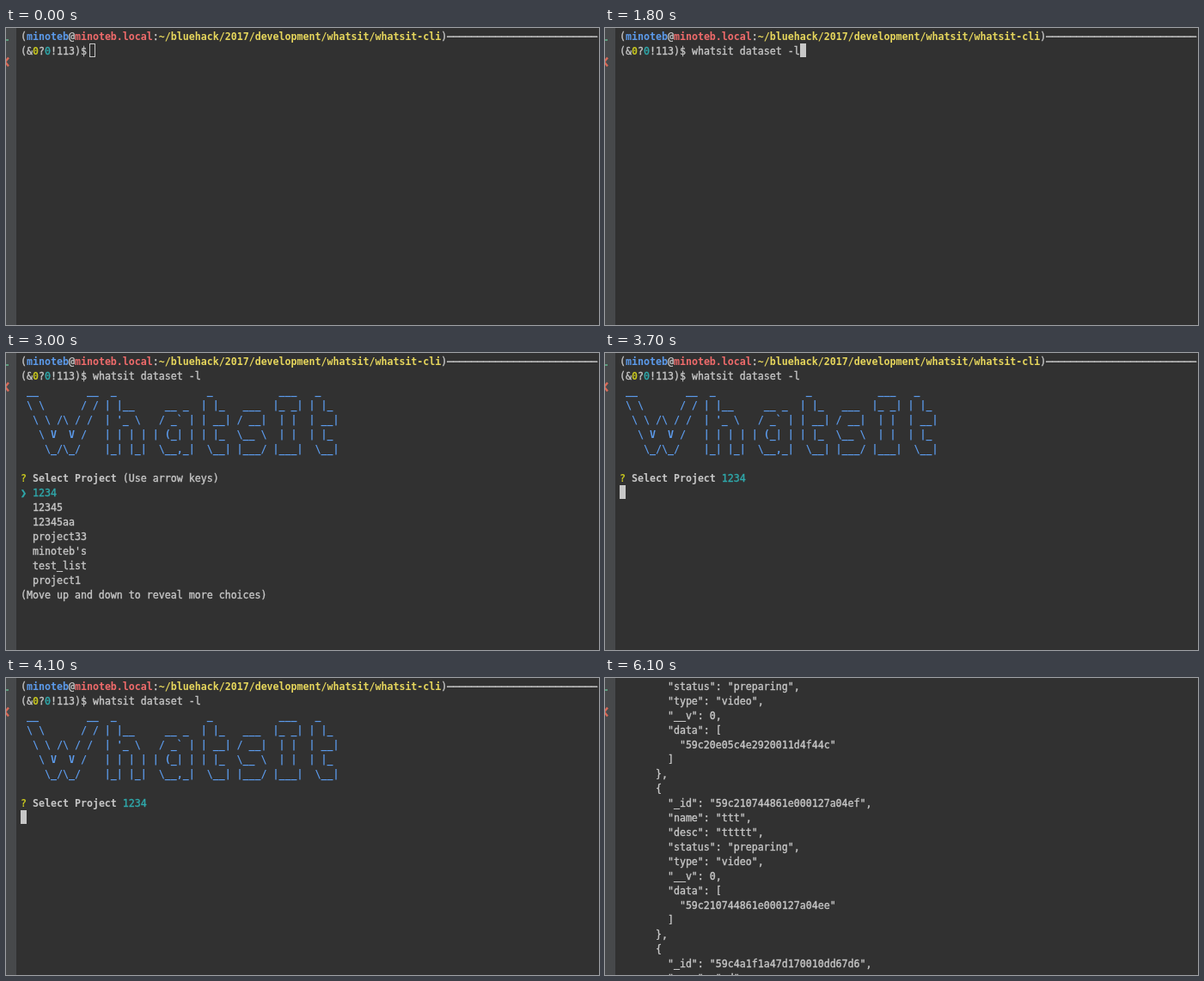
Write an HTML page that moves like this. It is 690 px wide and 346 px high and loops after 6200 ms.

```html
<!DOCTYPE html>
<html lang="en">
<head>
<meta charset="utf-8">
<title>Terminal session</title>
<style>
  html, body { margin: 0; width: 100%; height: 100%; overflow: hidden; background: #313131; }
  #stage { position: relative; width: 690px; height: 346px; overflow: hidden; }
  pre {
    position: absolute; left: 17px; top: 2px; margin: 0; color: #c7c7c7;
    font: 11.627px/17px "DejaVu Sans Mono", "Liberation Mono", monospace;
    font-variant-ligatures: none;
    -webkit-text-stroke: 0.35px;
  }
  pre.menu { top: 138px; }
  pre.banner { top: 36px; }
  b { -webkit-text-stroke: 0; }
  .blue { color: #5c9bec; }
  .red { color: #ef6b6b; }
  .gold { color: #e6d65c; }
  .lime { color: #c5c41f; }
  .cyan { color: #2fa9ab; }
  .arrow { display: inline-block; width: 1ch; }
  #cursor { position: absolute; width: 7px; height: 16px; box-sizing: border-box; border: 1px solid #c7c7c7; }
  #bar { position: absolute; left: 0; top: 0; }
</style>
</head>
<body>
<div id="stage">
  <pre id="prompt">(<b class="blue">minoteb</b>@<b class="red">minoteb.local</b>:<b class="gold">~/bluehack/2017/development/whatsit/whatsit-cli</b>)─────────────────────────
(&amp;<b class="lime">0</b>?<span class="cyan">0</span>!113)$ <span id="typed"></span></pre>

  <pre id="banner" class="banner blue"><b> __        __  _               _           ___   _
 \ \      / / | |__     __ _  | |_   ___  |_ _| | |_
  \ \ /\ / /  | '_ \   / _` | | __| / __|  | |  | __|
   \ V  V /   | | | | | (_| | | |_  \__ \  | |  | |_
    \_/\_/    |_| |_|  \__,_|  \__| |___/ |___|  \__|</b></pre>

  <pre id="menu" class="menu"><b class="lime">?</b> <b>Select Project</b> (Use arrow keys)
<span class="cyan"><span class="arrow">❯</span> 1234</span>
  12345
  12345aa
  project33
  minoteb's
  test_list
  project1
(Move up and down to reveal more choices)</pre>

  <pre id="answer" class="menu"><b class="lime">?</b> <b>Select Project</b> <span class="cyan">1234</span></pre>

  <pre id="json">        "status": "preparing",
        "type": "video",
        "__v": 0,
        "data": [
          "59c20e05c4e2920011d4f44c"
        ]
      },
      {
        "_id": "59c210744861e000127a04ef",
        "name": "ttt",
        "desc": "ttttt",
        "status": "preparing",
        "type": "video",
        "__v": 0,
        "data": [
          "59c210744861e000127a04ee"
        ]
      },
      {
        "_id": "59c4a1f1a47d170010dd67d6",
        "name": "ad",</pre>

  <div id="cursor"></div>
  <svg id="bar" width="12" height="346">
    <rect width="12" height="346" fill="#47494b"/>
    <path d="M0 14H3" stroke="#5fb08a" stroke-width="1.6"/>
    <path d="M3 34.5L-1 39.5L3 44.5" fill="none" stroke="#d96a58" stroke-width="2.4"/>
  </svg>
</div>
<script>
const LOOP = 6200;
const COMMAND = "whatsit dataset -l";
const TYPE_START = 200, TYPE_END = 1200;

// start time, visible parts, cursor row (null hides it)
const STEPS = [
  { at: 0, show: ["prompt"], row: 1 },
  { at: 2000, show: ["prompt"], row: 2 },
  { at: 2900, show: ["prompt", "banner", "menu"], row: null },
  { at: 3700, show: ["prompt", "banner", "answer"], row: 9 },
  { at: 4500, show: ["json"], row: null }
];
const PARTS = ["prompt", "banner", "menu", "answer", "json"];

const byId = id => document.getElementById(id);
const typed = byId("typed"), cursor = byId("cursor");

function typedCount(t) {
  const tick = Math.floor(t / 100) * 100;
  const part = (tick - TYPE_START) / (TYPE_END - TYPE_START);
  return Math.floor(COMMAND.length * Math.min(1, Math.max(0, part)));
}

function draw(t) {
  const step = STEPS.filter(s => s.at <= t).pop();
  for (const id of PARTS) {
    byId(id).style.visibility = step.show.includes(id) ? "visible" : "hidden";
  }
  const count = typedCount(t);
  typed.textContent = COMMAND.slice(0, count);

  const idle = count === 0;
  const x = step.row !== 1 ? 17 : idle ? 97 : 101 + count * 7;
  cursor.style.visibility = step.row === null ? "hidden" : "visible";
  cursor.style.left = x + "px";
  cursor.style.top = 1 + step.row * 17 + "px";
  cursor.style.background = idle ? "none" : "#c7c7c7";
}

const start = performance.now();
function frame() {
  draw((performance.now() - start) % LOOP);
  requestAnimationFrame(frame);
}
frame();
</script>
</body>
</html>
```
